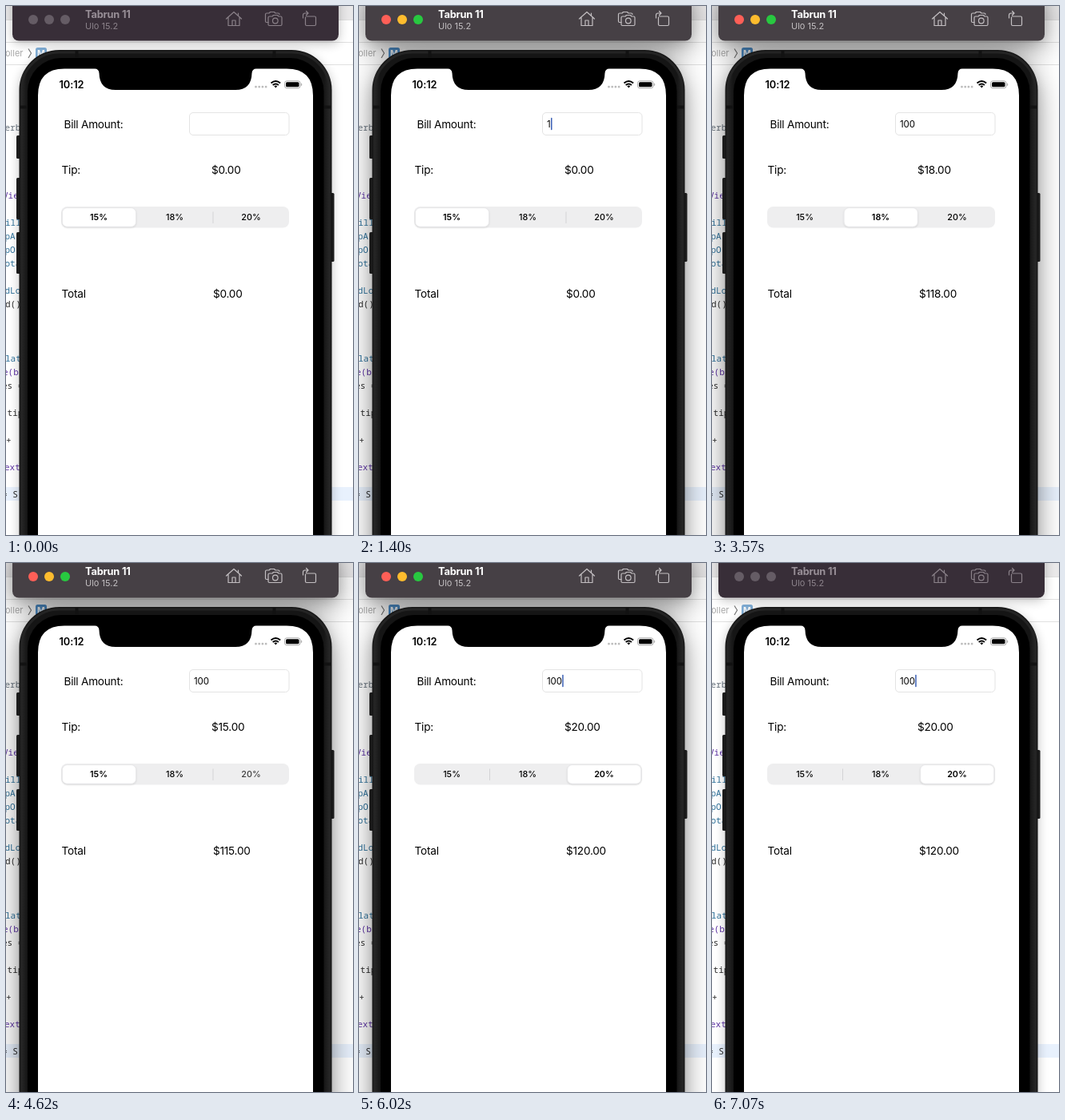
Animation, 434 px wide and 662 px high, one loop 7.21 s. Source, as an HTML page:

```html
<!DOCTYPE html>
<html lang="en">
<head>
<meta charset="utf-8">
<title>Tip calculator</title>
<style>
  html, body { margin: 0; width: 100%; height: 100%; overflow: hidden; background: #fff; }
  svg { display: block; width: 434px; height: 662px; }
  text { font-family: Inter, "Liberation Sans", sans-serif; white-space: pre; }
  .code text { font: 11px "Noto Sans Mono", "DejaVu Sans Mono", monospace; }
  .body text { font-size: 13.6px; letter-spacing: -.22px; }
  .seg text { font-size: 10.8px; text-anchor: middle; }
  .icons { fill: none; stroke-width: 1.2; stroke-linejoin: round; stroke-linecap: round; }
</style>
</head>
<body>
<svg viewBox="0 0 434 662">
  <defs>
    <filter id="wide" x="-25%" y="-25%" width="150%" height="150%"><feGaussianBlur stdDeviation="17"/></filter>
    <filter id="tight" x="-20%" y="-20%" width="140%" height="140%"><feGaussianBlur stdDeviation="7"/></filter>
    <filter id="lift" x="-20%" y="-30%" width="140%" height="180%"><feDropShadow dx="0" dy="1" stdDeviation="1.1" flood-opacity=".14"/></filter>
    <linearGradient id="rim">
      <stop offset="0" stop-color="#141414"/><stop offset=".01" stop-color="#242424"/>
      <stop offset=".026" stop-color="#151515"/><stop offset=".974" stop-color="#151515"/>
      <stop offset=".99" stop-color="#242424"/><stop offset="1" stop-color="#141414"/>
    </linearGradient>
    <g id="outline">
      <rect x="8" y="-20" width="408" height="63" rx="9"/>
      <rect x="16.500" y="55" width="391" height="720" rx="50"/>
    </g>
  </defs>

  <!-- editor behind the device -->
  <rect width="434" height="662" fill="#fff"/>
  <rect width="434" height="17" fill="#e9e8e9"/>
  <path d="M0 17.5H434M0 45.5H434M0 73.5H434" stroke="#e0e0e0"/>
  <rect y="602" width="434" height="17" fill="#e8f1fd"/>
  <text x="-1" y="63" font-size="11" fill="#a9a9a9">oller</text>
  <path d="M28 53.5l3.5 5.5-3.5 6" fill="none" stroke="#777" stroke-width="1.2"/>
  <g id="badge"><rect x="37" y="52" width="14" height="14" rx="2.5" fill="#4e8fca"/>
    <text x="44" y="63" font-size="10.5" font-weight="700" fill="#fff" text-anchor="middle">M</text></g>
  <g class="code" id="code"></g>

  <use href="#outline" id="softShadow" y="4" filter="url(#tight)"/>
  <use href="#outline" id="deepShadow" y="11" filter="url(#wide)"/>

  <!-- device -->
  <g fill="#1b1b1b">
    <rect x="13" y="162" width="6" height="29" rx="1.5"/>
    <rect x="13" y="215" width="6" height="52" rx="1.5"/>
    <rect x="13" y="283" width="6" height="52" rx="1.5"/>
    <rect x="405" y="234" width="5.5" height="86" rx="1.5"/>
  </g>
  <rect x="16.5" y="55" width="391" height="720" rx="50" fill="url(#rim)"/>
  <rect x="19.5" y="58" width="385" height="720" rx="47" fill="none" stroke="#242424" stroke-width="3"/>
  <path d="M88.5 56v8M335.5 56v8M18 126.5h8M398 126.5h8" stroke="#121212" stroke-width="4"/>
  <rect x="27" y="65" width="370.5" height="720" rx="42"/>
  <path d="M40 662V112Q40 78.5 73 78.500H111Q116 78.500 116.500 84Q117 105 137 105H287Q307 105 307.500 84Q308 78.500 313 78.500H351Q384 78.500 384 112V662Z" fill="#fff"/>

  <!-- status bar -->
  <text x="66.5" y="102.7" font-size="12.8" font-weight="600" letter-spacing="-.1">10:12</text>
  <path d="M312.5 101.2h13" stroke="#bcbcbc" stroke-width="2.8" stroke-linecap="round" stroke-dasharray="0 4.2"/>
  <g fill="none" stroke="#000" stroke-width="2">
    <path d="M331.5 96.6Q337.3 91.5 343.1 96.6M333.7 99Q337.3 96 340.9 99"/>
    <path d="M335.3 100.3Q337.3 98.9 339.3 100.3L337.3 102.6Z" fill="#000" stroke="none"/>
  </g>
  <rect x="348.5" y="93.8" width="19.5" height="9" rx="2.7" fill="none" stroke="#aaa"/>
  <rect x="350" y="95.3" width="16.5" height="6" rx="1.5"/>
  <path d="M369.2 96.8q1.5 1.5 0 3z" fill="#aaa" stroke="#aaa" stroke-width=".6"/>

  <!-- calculator -->
  <g class="body">
    <text x="72.5" y="152.8">Bill Amount:</text>
    <text x="69.5" y="209.8">Tip:</text>
    <text x="257" y="209.8" id="tip"></text>
    <text x="69.5" y="364.8">Total</text>
    <text x="259" y="364.8" id="total"></text>
  </g>
  <rect x="229.5" y="133.5" width="124.5" height="28" rx="4.5" fill="#fff" stroke="#e4e4e4"/>
  <text x="235" y="151.8" font-size="11.5" letter-spacing="-.15" id="amount"></text>
  <rect y="139.8" width="1.5" height="15.5" rx=".7" fill="#3a5fb4" id="caret"/>

  <rect x="69" y="251" width="285" height="26.5" rx="7.5" fill="#eeeeef"/>
  <path d="M163.5 257.5v14.5" stroke="#d3d3d5" id="dividerA"/>
  <path d="M259 257.5v14.5" stroke="#d3d3d5" id="dividerB"/>
  <rect y="252.7" width="92" height="23.5" rx="6" fill="#fff" stroke="#dfdfe0" stroke-width=".5" filter="url(#lift)" id="thumb"/>
  <g class="seg" id="labels"></g>

  <!-- window bar -->
  <rect x="8" y="-20" width="408" height="63.5" rx="8" id="bar"/>
  <g id="lights"></g>
  <text x="99" y="15" font-size="12.8" font-weight="700" letter-spacing="-.2" id="device">Tabrun 11</text>
  <text x="99" y="29" font-size="11" id="system">Ulo 15.2</text>
  <g class="icons" id="icons">
    <path d="M275.5 16L285 7.5 294.5 16M278 14.5V24.5H292V14.5M283 24.5V18H287V24.5M290.5 9V12"/>
    <path d="M328 20.5H326Q324.5 20.5 324.5 19V10.5Q324.5 9 326 9H329L330.5 7.5H335.5L337 9H340.5Q342 9 342 10.5"/>
    <path d="M329.5 13H333L334.5 11.5H339.5L341 13H343.5Q345 13 345 14.5V23Q345 24.5 343.5 24.5H329.5Q328 24.5 328 23V14.5Q328 13 329.5 13Z"/>
    <circle cx="336.8" cy="18.5" r="3.3"/>
    <path d="M375.5 13H386Q387.500 13 387.500 14.500V23Q387.500 24.500 386 24.500H376Q374.500 24.500 374.500 23V14M371.500 15V11.500Q371.500 9 374 9H378M375.500 6.500L378 9 375.500 11.500"/>
  </g>
</svg>

<script>
const LOOP = 7210, STEP = 70;
const $ = id => document.getElementById(id);
const set = (node, attrs) => { for (const k in attrs) node.setAttribute(k, attrs[k]); };
const clamp = v => Math.max(0, Math.min(1, v));
const mix = (a, b, p) => a + (b - a) * p;

function add(parent, tag, attrs, text = '') {
  const node = document.createElementNS('http://www.w3.org/2000/svg', tag);
  set(node, attrs);
  node.textContent = text;
  return parent.appendChild(node);
}

// Editor lines: row, left edge, colour, text
const teal = '#2f729b', purple = '#5f35a5', ink = '#2c2c2c';
[
  [0, -1.5, '#68737e', 'erb'], [5, -4, purple, 'Vie'], [7, -1, teal, 'ill'], [8, -1.5, teal, 'pA'],
  [9, -1.5, teal, 'pO'], [10, -1.5, teal, 'ota'], [12, -1.5, teal, 'dLo'], [13, -1, ink, 'd()'],
  [17, -1, teal, 'lat'], [18, -4, purple, 'e(b'], [19, -5, ink, 'es ='], [21, -5, ink, '(tip'],
  [23, 0, ink, '+ '], [25, -2, purple, 'ext'], [27, -5, ink, '= S']
].forEach(([row, x, fill, text]) => add($('code'), 'text', { x, y: 156 + row * 17, fill }, text));

const lightColors = ['#fe5f57', '#febc2e', '#28c840'];
const lights = lightColors.map((c, i) => add($('lights'), 'circle', { cx: 34 + i * 20, cy: 17, r: 6 }));

const rates = [15, 18, 20];
const labels = rates.map((rate, i) =>
  add($('labels'), 'text', { x: [116, 211, 306.5][i], y: 268.4 }, rate + '%'));
const thumbX = [70.5, 165.2, 260.7];

const presses = [{ at: 3080, to: 1 }, { at: 3850, to: 0 }, { at: 4620, to: 2 }];
const keys = [
  { at: 490, text: '', caret: 235.8 }, { at: 1400, text: '1', caret: 240 },
  { at: 1680, text: '10', caret: 247 }, { at: 1820, text: '100', caret: 254.2 }
];

function caretOpacity(age) {
  const phase = age % 1050;
  if (phase < 560) return 1;
  if (phase < 630) return .5;
  if (phase < 910) return 0;
  return phase < 980 ? .5 : 1;
}

function drawField(t) {
  const key = keys.filter(k => t >= k.at).pop();
  $('amount').textContent = key ? key.text : '';
  set($('caret'), { x: key ? key.caret : 0, opacity: key ? caretOpacity(t - key.at) : 0 });
}

function drawSegments(t) {
  let selected = 0, position = thumbX[0], pressed = -1, dim = 1, computed = false;
  for (const { at, to } of presses) {
    if (t < at) break;
    const age = t - at;
    if (age < 140) {
      pressed = to;
      dim = age < 70 ? .75 : .45;
    } else {
      const p = clamp((age - 105) / 385);
      position = mix(position, thumbX[to], 1 - (1 - p) ** 3);
      selected = to;
      computed = true;
      if (p < .3) { pressed = to; dim = .75; }
    }
  }
  labels.forEach((label, i) => set(label, {
    'font-weight': i === selected ? 600 : 500,
    opacity: i === pressed ? dim : 1
  }));
  const tip = computed ? rates[selected] : 0;
  $('tip').textContent = '$' + tip.toFixed(2);
  $('total').textContent = '$' + (computed ? 100 + tip : 0).toFixed(2);
  set($('thumb'), { x: position });
  set($('dividerA'), { opacity: clamp((position - thumbX[1]) / 60) });
  set($('dividerB'), { opacity: clamp((thumbX[1] - position) / 60) });
}

function drawWindow(t) {
  const active = t >= 70 && t < 6580;
  const focus = active ? (t < 140 ? .5 : 1) : (t >= 6580 && t < 6650 ? .5 : 0);
  set($('deepShadow'), { opacity: .44 * focus });
  set($('softShadow'), { opacity: mix(.24, .08, focus) });
  set($('badge'), { opacity: active ? 1 : .7 });
  set($('bar'), { fill: active ? '#464045' : '#382e38' });
  set($('device'), { fill: active ? '#fff' : '#988f97' });
  set($('system'), { fill: active ? '#c2bec1' : '#8b828a' });
  set($('icons'), { stroke: active ? '#c3bfc2' : '#8a8189' });
  lights.forEach((light, i) => set(light, { fill: active ? lightColors[i] : '#655c65' }));
}

function render(now) {
  const t = Math.floor(now % LOOP / STEP) * STEP;
  drawWindow(t);
  drawField(t);
  drawSegments(t);
}

const start = performance.now();
function tick() {
  render(performance.now() - start);
  requestAnimationFrame(tick);
}
tick();
</script>
</body>
</html>
```
